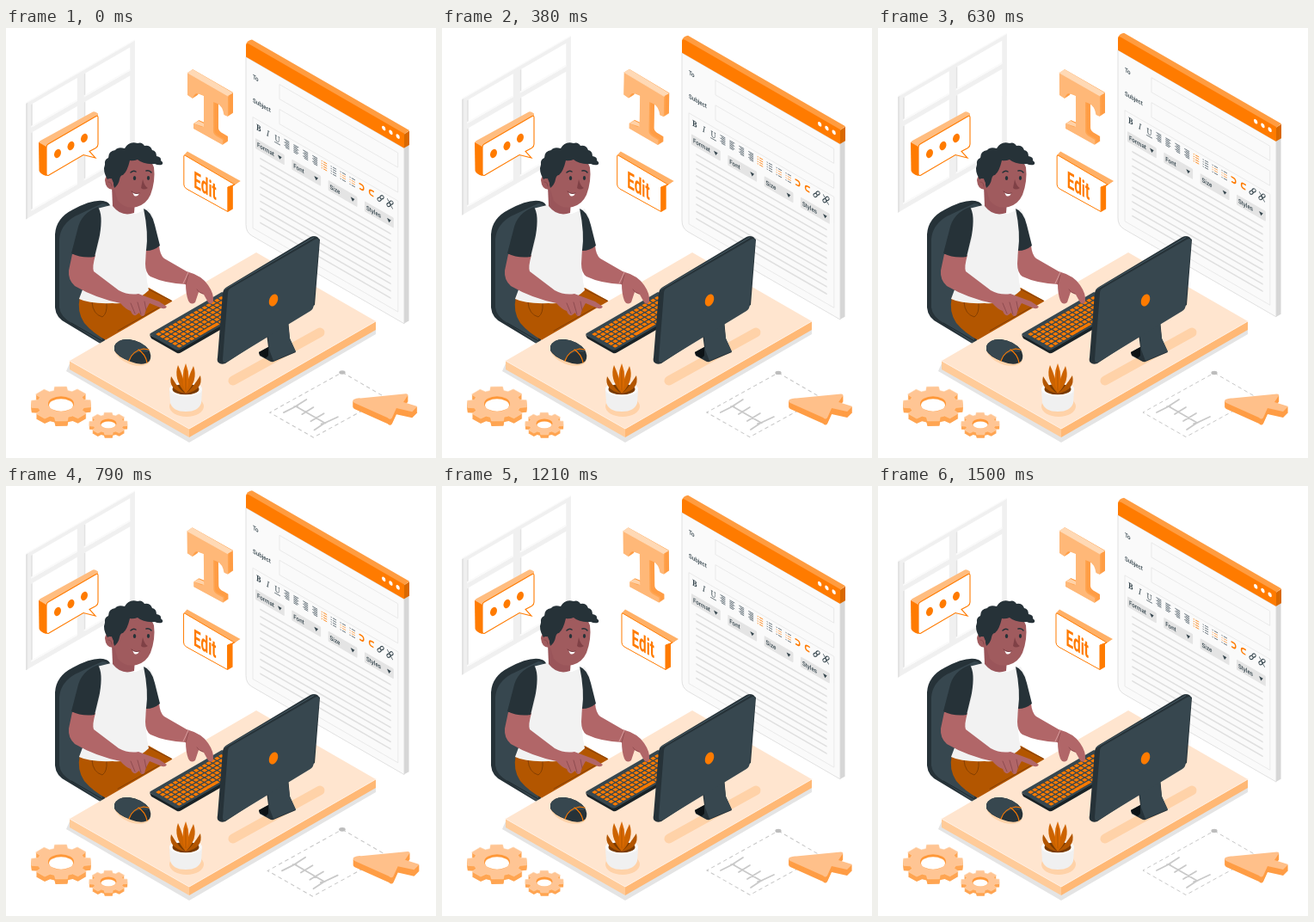
Write an HTML page that moves like this. It is 500x500 px and loops after 1.54 s.

```html
<!DOCTYPE html>
<html lang="en">
<head>
<meta charset="utf-8">
<title>Editing at a desk</title>
<style>
html, body { margin: 0; width: 100%; height: 100%; overflow: hidden; background: #fff; }
svg { display: block; width: 100vw; height: 100vh; }
</style>
</head>
<body>
<svg id="stage" viewBox="0 0 500 500" xmlns="http://www.w3.org/2000/svg"></svg>
<script>
const ORANGE = '#ff7b00', DARK = '#263238', SLATE = '#37474f', SKIN = '#b16668', SHADE = '#9a555a';

const path = (d, fill, more = '') => `<path d="${d}" fill="${fill}" ${more}/>`;
const poly = (pts, fill, more = '') => `<polygon points="${pts}" fill="${fill}" ${more}/>`;
const line = (d, color, w, more = '') =>
  `<path d="${d}" fill="none" stroke="${color}" stroke-width="${w}" stroke-linecap="round" stroke-linejoin="round" ${more}/>`;
const rect = (x, y, w, h, fill, more = '') =>
  `<rect x="${x}" y="${y}" width="${w}" height="${h}" fill="${fill}" ${more}/>`;
const oval = (x, y, rx, ry, fill, turn = 0, more = '') =>
  `<ellipse cx="${x}" cy="${y}" rx="${rx}" ry="${ry}" fill="${fill}" transform="rotate(${turn} ${x} ${y})" ${more}/>`;
const text = (x, y, size, str, more = '') =>
  `<text x="${x}" y="${y}" font-size="${size}" ${more}>${str}</text>`;
const group = (body, more = '') => `<g ${more}>${body}</g>`;
const times = (n, fn) => Array.from({ length: n }, (_, i) => fn(i)).join('');

function roomWindow() {
  const iso = 'transform="matrix(.866 -.5 0 1 23 88)"';
  const pane = (x, y, h) =>
    rect(x, y, 62, h, '#fff') + rect(x, y, 2, h, '#e3e3e3') + rect(x, y + h - 2, 62, 2, '#fafafa');
  return group(
    rect(0, 0, 146.5, 135, '#f0f0f0') + rect(0, 0, 2.5, 135, '#e3e3e3') + rect(0, -1, 146.5, 1.5, '#fafafa') +
    pane(7, 5, 27) + pane(78, 5, 27) + pane(7, 38, 91) + pane(78, 38, 91), iso);
}

function toolbar() {
  const y = 74, step = 12.6, x = i => 17 + i * step;
  const serif = 'font-family="Noto Serif, serif" text-anchor="middle" fill="#37474f"';
  let s = text(x(0), y + 3.5, 9.5, 'B', serif + ' font-weight="700"') +
    text(x(1), y + 3.5, 9.5, 'I', serif + ' font-style="italic"') +
    text(x(2), y + 3.5, 9.5, 'U', serif) + line(`M${x(2) - 3.5} ${y + 5.5}h7`, SLATE, .7);
  for (let i = 3; i < 11; i++) {
    const list = i > 6, color = i === 7 ? ORANGE : '#52616a';
    s += times(list ? 4 : 6, k => {
      const ky = y - 4 + k * (list ? 2.7 : 1.7), inset = i < 7 && k % 2 ? 1.6 : 0;
      return list
        ? line(`M${x(i) - 3.5} ${ky}h.6M${x(i) - .8} ${ky}h4`, i > 8 && k % 3 ? '#ff9c45' : color, .8)
        : line(`M${x(i) - 3 + (i === 4 ? 0 : inset)} ${ky}h${6 - inset}`, color, .8);
    });
  }
  s += line(`M${x(11) - 3} ${y - 3}h2.6a2.7 2.7 0 0 1 0 5.6h-2`, ORANGE, 1.7) +
    line(`M${x(12) + 3} ${y - 3}h-2.6a2.7 2.7 0 0 0 0 5.6h2`, ORANGE, 1.7);
  [13, 14].forEach(i => {
    s += oval(x(i) - 1.7, y + 2, 3, 1.7, 'none', -45, 'stroke="#37474f"') +
      oval(x(i) + 1.7, y - 2, 3, 1.7, 'none', -45, 'stroke="#37474f"');
  });
  return s + line(`M${x(14) - 3.5} ${y - 4}l7 8`, SLATE, .9);
}

function mailWindow() {
  const sans = 'font-family="Roboto, sans-serif" font-weight="500" fill="#37474f"';
  const box = 'stroke="#e6e6e6" stroke-width=".8"';
  const menu = (name, i) => {
    const x = 12.7 + i * 48.9;
    return rect(x, 88, 39, 12, '#e4e4e4', 'rx="1"') + text(x + 2.2, 96.8, 7.2, name, sans) +
      path(`M${x + 30} 92.5h5.4l-2.7 4z`, SLATE);
  };
  const face = path('M0 0H212.5V204H8Q0 204 0 195Z', '#fafafa', 'stroke="#dcdcdc" stroke-width=".8"') +
    path('M0 0V-13Q0 -17 4 -17H212.5V0Z', ORANGE) +
    [185, 194.5, 204].map(x => oval(x, -9.5, 2.5, 2.5, '#fff')).join('') +
    text(9.2, 20.5, 7.2, 'To', sans) + text(9.2, 48, 7.2, 'Subject', sans) +
    rect(45, 9.5, 159, 17, '#fafafa', box) + rect(45, 38.5, 159, 17, '#fafafa', box) +
    rect(9.2, 65.4, 195, 129, '#fafafa', box) + toolbar() +
    ['Format', 'Font', 'Size', 'Styles'].map(menu).join('') +
    times(10, i => line(`M19.6 ${108.5 + i * 8.3}H194`, '#e0e0e0', 1.8));
  return path('M463 140L468.5 136.5V341L463 344Z', '#d6d6d6') +
    path('M279 20Q280 15 286 14L469 119.5L463 124Z', '#ff9c40') +
    path('M463 124L469 120V136.5L463 140Z', '#d96800') +
    group(face, 'transform="matrix(.866 .5 0 1 279 34)"');
}

function bubble() {
  return path('M38 134Q38 132 40 131L101 97.5Q103 96.500 107 99.500L107 102L47 138Z', '#ffbd80') +
    path('M38 133L47 138V172Q40 170 38.500 166Z', ORANGE) +
    path('M47 139Q47 136 49 135L104 103Q107 101 107 104V135Q107 138 104.500 139.500L97 143.500L104 151L90 147.500L50 171Q47 172.500 47 169Z',
      '#fff', `stroke="${ORANGE}" stroke-width="1.1"`) +
    [[60, 146], [75.5, 137], [91, 128]].map(([x, y]) => oval(x, y, 3.7, 5.4, ORANGE, 22)).join('');
}

function letterT() {
  const d = 'M211 52L258 79V103L253.500 101Q252 91 246 88L241 86V120Q241 124 247 127L252 130V136L218 117V111L225 114Q230 117 230 112V79L225 77Q219 74 217 82L211 78Z';
  const depth = times(12, i => path(d, i > 8 ? '#ffa552' : '#ff9d45', `transform="translate(${6 - i / 2} ${i / 3 - 4})"`));
  return depth + path('M211 52L217 48L264 75.500L258 79Z', '#ffd9b5') + path(d, '#ffb878') +
    path('M218 111L224 108L230 111V115Z', '#ffd2a8') + line('M211 52L258 79', '#ffe0c2', .8);
}

function editSign() {
  return path('M258 185L272 178L264 184V210.500L258 214Z', ORANGE) +
    path('M207 148L211 143.500L273 178L266 182Z', '#ffb066') +
    path('M207 149Q207 147 209 148.500L266 182L258 185V213.500L210 187Q207 185 207 182Z', '#fff', `stroke="${ORANGE}" stroke-width="1"`) +
    group(text(0, 0, 27, 'Edit', `font-family="Roboto, sans-serif" font-weight="700" fill="${ORANGE}"`),
      'transform="matrix(.57 .33 0 1 218.500 185)"');
}

function chair() {
  return path('M57 240Q58 221 78 211Q100 199 113 201Q124 203 121 214L112 350L118 372L70 343Q58 337 57 325Z', DARK) +
    path('M62 246Q63 229 80 219L112 204Q121 204 120 216L112 345L112 368L76 343Q63 335 62 325Z', SLATE) +
    line('M76 343L112 364', '#1e292e', 1);
}

function body() {
  return path('M86 312Q82 330 91 343Q101 355 118 364L195 322L193 317L166 302Z', '#b35600') +
    line('M100 319Q101 333 112 336Q118 332 117 320M164 303L192 317M130 352L178 325', '#7f3d00', .9) +
    path('M106 210L126 205Q136 217 151 216L166 210L172 222L164 260Q161 285 166 305Q148 322 124 320Q97 321 85 315Q93 295 98 272Z', '#f2f2f2') +
    line('M103 266L109 243M163 265L165 246', '#dedede', 1) +
    path('M123 184L124 207Q134 220 149 215L150 202Z', SHADE);
}

function head() {
  return path('M121 174Q116 170 115 177Q116 189 126 188L130 201Q139 211 152 208Q163 205 168 194Q174 178 172 162Q168 150 150 150L125 158Z', '#a05b5e') +
    path('M118 176Q112 166 115 159Q114 153 119 151Q119 143 127 142Q130 138 138 140Q143 131 153 134Q158 132 161 137Q168 136 170 142Q175 143 175 149Q181 150 180 154Q184 157 181 159Q177 160 173 158Q160 159 153 153Q148 155 144 154Q141 167 136 171Q133 171 132 176Q131 182 126 186L123 175Z', DARK) +
    oval(121, 181, 4, 6, '#a05b5e', -14) + line('M119 179Q123 179 123 184', '#834448', .8) +
    oval(149.5, 174.5, 1.7, 2.5, DARK) + oval(165.5, 174.5, 1.6, 2.4, DARK) +
    line('M145 168Q148 165 151 167M163 166Q167 165 169 168', DARK, 1.5) +
    path('M159 176Q161 184 165 186Q160 189 157 186Z', '#7f4146') +
    path('M147 191Q151 194 155 192Q153 197 149 195Z', '#fff') + line('M146 190Q150 194 155 192', '#6c3338', .9);
}

function arms() {
  return path('M77 263L104 264Q100 278 102 283L131 305Q142 311 154 309L178 318L187 324Q185 328 179 325L167 320L163 327L161 334Q157 337 155 331L151 334Q147 335 145 329Q139 327 133 320Q104 314 80 300Q72 293 73 282Z', SKIN) +
    line('M145 320L150 332M153 319L157 333M161 318L163 328', '#8b494d', .9) +
    path('M83 235Q87 215 107 208Q113 217 109 241L103 266Q88 268 76 262Z', DARK) +
    path('M163 257L178 253Q179 264 184 268L210 283Q228 288 235 299Q242 309 241 318Q239 323 235 319L230 310L224 307L220 319Q215 323 212 317Q209 309 209 298Q185 297 168 289Q162 285 162 274Z', SKIN) +
    line('M209 298L212 287M222 304Q224 308 229 309', '#8b494d', .8) + line('M206 297Q209 291 212 284', '#e0aaaa', .8) +
    path('M160 210Q169 213 173 229L179 253Q172 259 163 259Q166 239 160 210Z', DARK);
}

function desk() {
  return poly('70,399 213,482 430,356 430,350 213,470 74,390', '#e4e4e4') +
    poly('74,387 213,466 213,476 74,397', '#ffcb99') +
    poly('213,466 430,341 430,351 213,476', '#ffb875') +
    poly('291,261 430,341 213,466 74,387', '#ffe5cf') +
    line('M74 387L213 466L430 341', '#ffefe0', 1) +
    line('M264 410L365 354', '#ffd2a8', 11);
}

function keyboard() {
  const key = (r, c) => {
    const wide = r === 5 && c > 4 && c < 9;
    return rect(4 + c * 5.6, 3 + r * 5.5, wide ? 5.8 : 4.2, 4, ORANGE, 'rx=".6"');
  };
  return path('M167 357L169 361L199 378Q201 379 204 377L256 347V340L200 372Z', '#192226') +
    path('M168 355L251 307L285 326L204 373Q200 376 197 374L169 358Q166 356.500 168 355Z', SLATE) +
    group(times(6, r => times(18, c => key(r, c))), 'transform="matrix(.866 -.5 .866 .5 168 356.500)"');
}

function mouse() {
  return oval(147, 379, 22, 12, '#ffd2a8', 22) +
    path('M126 370Q130 361 143 362Q158 364 166 374Q170 381 167 387Q160 394 145 388Q129 382 126 375Z', DARK) +
    path('M126 370Q130 361 143 362Q158 364 166 374Q167 378 158 376Q146 378 143 387Q129 381 126 374Z', SLATE) +
    line('M143 387Q147 375 160 373L166 374M154 374Q162 379 164 389', ORANGE, 1.2);
}

function monitor() {
  return path('M294 377L305 371L302 348L325 335L328 338L330 361L337 377L311 388Q309 389 306 387L295 381Z', DARK) +
    path('M304 349L327 337L330 361L337 376L311 387L306 374Z', SLATE) +
    path('M294 377L305 371V381L302 384L295 380Z', '#0c1215') +
    path('M252 308Q253 303 257 301L354 243Q358 241 362 243L365 246L359 322L255 390Q250 392 247 389Q245 387 246 383Z', DARK) +
    path('M258 308Q258 304 262 302L359 246Q365 243 364 250L358 321Q358 326 354 329L257 388Q252 391 252 385Z', SLATE) +
    line('M254 304L358 243.500', '#455a64', 1) + oval(311, 316.5, 4.8, 7.4, ORANGE, 23);
}

function plant() {
  const leaf = (x, y, bend, fill) =>
    path(`M209 425Q${x - 7 + bend} ${y + 16} ${x} ${y}Q${x + 7 + bend} ${y + 17} 209 425Z`, fill);
  return oval(210, 440, 20, 12, '#ffd2a8') +
    path('M190 421Q190 413 209 412Q228 413 228 421L227 436Q224 446 209 446Q194 446 191 436Z', '#f0f0f0') +
    oval(209, 420, 19, 8.5, '#fafafa') + oval(209, 420, 15.5, 6.3, '#7a3b00') +
    leaf(192, 405, 3, '#b35600') + leaf(226, 404, -3, '#b35600') + leaf(200, 392, 1, '#cc6300') +
    leaf(218, 393, -1, '#cc6300') + leaf(209, 390, 0, '#d96900') + line('M209 421V398', '#a14e00', .7);
}

function gear(cx, cy, r, hole, depth) {
  const pts = [];
  for (let i = 0; i < 8; i++) {
    [[-.29, .79], [-.2, 1], [.2, 1], [.29, .79]].forEach(([da, k]) => {
      const a = (i + .5) * Math.PI / 4 + da + .38;
      pts.push((cx + r * k * Math.cos(a)).toFixed(1) + ',' + (cy + r * k * .58 * Math.sin(a)).toFixed(1));
    });
  }
  const d = pts.join(' ');
  return times(depth, i => poly(d, '#ffa552', `transform="translate(0 ${depth - i})"`)) +
    poly(d, '#ffc594', 'stroke="#ffd2a8" stroke-width=".6"') +
    oval(cx, cy, hole, hole * .58, '#ff9838') + oval(cx, cy + 1.5, hole - 1, hole * .58 - 1.5, '#fff');
}

function pointer() {
  const d = 'M404 432Q408 430 412 430.500L464 425.500Q468 426 465 429L461 435L477 440L471 446L453 442L448 453Q446 456 443 453L405 436Q402 434 404 432Z';
  return poly('391,401 441,430 358,475.500 308,447', 'none', 'stroke="#c7c7c7" stroke-dasharray="4.500 3.500"') +
    oval(391, 401, 3.6, 2.2, '#bdbdbd') +
    line('M324 447L336 441L350 432M338 440L371 459M359 467L371 459L386 452M336 440L340 440M367 460L372 459M345 449L358 441M355 457L370 448', '#c9c9c9', 1.7) +
    times(7, i => path(d, '#ff9d45', `transform="translate(0 ${7 - i})"`)) + path(d, '#ffc08a');
}

document.getElementById('stage').innerHTML =
  group(roomWindow(), 'id="room"') + group(mailWindow(), 'id="mail"') + bubble() +
  group(letterT(), 'id="letter"') + group(editSign(), 'id="edit"') +
  chair() + body() + head() + desk() + keyboard() + arms() + mouse() + monitor() + plant() +
  gear(64, 437, 35, 15, 6) + gear(119, 460, 22.5, 9.5, 4) + group(pointer(), 'id="pointer"');

const LOOP = 1540, LEAD = 20;
const parts = Object.fromEntries(['room', 'mail', 'letter', 'edit', 'pointer'].map(id => [id, document.getElementById(id)]));

// CSS "ease": cubic-bezier(.25, .1, .25, 1)
function ease(x) {
  let lo = 0, hi = 1;
  for (let i = 0; i < 20; i++) {
    const m = (lo + hi) / 2, n = 1 - m;
    if (.75 * n * n * m + .75 * n * m * m + m * m * m < x) lo = m; else hi = m;
  }
  return .3 * (1 - lo) ** 2 * lo + 3 * (1 - lo) * lo * lo + lo ** 3;
}

function track(keys, p, curve = x => x) {
  let i = 1;
  while (i < keys.length - 1 && p > keys[i][0]) i++;
  const [a, from] = keys[i - 1], [b, to] = keys[i];
  return from + (to - from) * curve((p - a) / (b - a));
}

const FLOAT = [[0, -.4], [725, -9.5], [1475, 0], [1540, -.4]];
const SHAKE = [0, -1, 2, -4, 4, -4, 4, -4, 2, -1, 0].map((v, i) => [i / 10, v]);
const BEAT = [[0, 1], [.1, 1.1], [.3, 1], [.5, 1], [.6, 1.1], [.8, 1], [1, 1]];
const WIND = [[0, 0], [.25, 1], [.75, -1], [1, 0]];

function draw(ms) {
  const t = ms % LOOP, p = (t + LEAD) % LOOP / LOOP;
  const set = (id, value) => parts[id].setAttribute('transform', value);
  const rise = `translate(0 ${track(FLOAT, t)})`;
  set('room', rise);
  set('mail', rise);
  set('edit', `translate(${track(SHAKE, p, ease)} 0)`);
  set('letter', `rotate(${track(WIND, p, ease)} 237.500 92)`);
  set('pointer', `translate(392.500 438) scale(${track(BEAT, p, ease)}) translate(-392.500 -438)`);
}

const start = performance.now();
function tick() {
  draw(performance.now() - start);
  requestAnimationFrame(tick);
}
draw(0);
requestAnimationFrame(tick);
</script>
</body>
</html>
```
